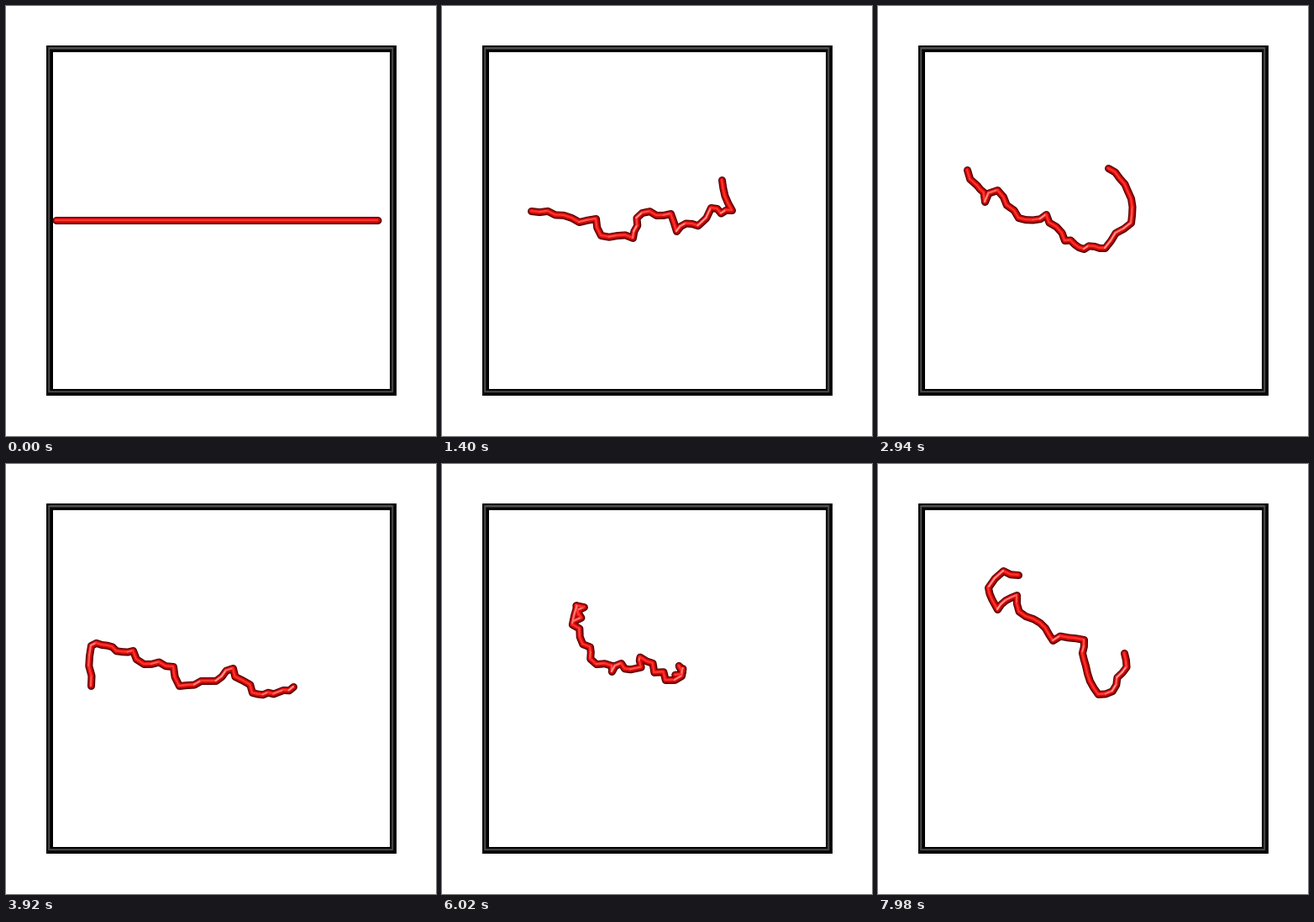
Recreate the animation shown at these times as a matplotlib script. Size 512 px wide and 512 px high, loop 8000 ms.

```python
import numpy as np
import matplotlib.pyplot as plt
from matplotlib.animation import FuncAnimation
from matplotlib.collections import LineCollection

SIZE, DPI = 512, 64
PX = 72 / DPI               # one pixel in points
BEADS, BOND = 40, 9.83      # chain length and bond length in pixels
TICK, HOLD, FRAMES = 20, 7, 400
ROUGH, TURN = 0.13, 0.3     # kinks along the chain, turning per step
rng = np.random.default_rng(11)


def chain(*corners):
    """Crumple a coarse outline: split the longest bond, push its middle aside."""
    pts = [np.array(c, float) for c in corners]
    while len(pts) < BEADS:
        gaps = np.diff(pts, axis=0)
        k = int(np.argmax(np.hypot(*gaps.T)))
        side = gaps[k][::-1] * (-1, 1)
        pts.insert(k + 1, (pts[k] + pts[k + 1]) / 2 + side * rng.normal(0, ROUGH))
    return np.array(pts) + 0.5


straight = np.column_stack([np.linspace(60, 443, BEADS), np.full(BEADS, 255.5)])
coiled = chain((106, 244), (183, 253), (189, 273), (227, 276), (238, 246),
               (272, 247), (279, 268), (320, 240), (345, 243), (333, 207))
sagging = chain((106, 195), (127, 233), (142, 219), (167, 252), (200, 248),
                (222, 279), (270, 288), (301, 258), (297, 220), (274, 193))
hooked = chain((101, 264), (101, 216), (151, 222), (164, 238), (199, 241),
               (206, 264), (241, 258), (270, 243), (293, 272), (342, 265))
curled = chain((117, 243), (107, 210), (125, 190), (138, 213), (189, 248),
               (224, 231), (251, 237), (260, 266), (304, 288), (303, 232))
waved = chain((150, 146), (170, 163), (155, 194), (174, 199), (184, 227),
              (213, 247), (232, 203), (290, 197), (317, 233), (298, 240))
folded = chain((167, 132), (149, 127), (131, 147), (142, 173), (165, 156),
               (208, 210), (245, 209), (247, 240), (262, 274), (293, 225))

KEYS = [(0, straight), (10, coiled), (21, sagging), (28, hooked),
        (37, curled), (49, waved), (57, folded)]


def bonds(pts):
    """Bond vectors in 3D; depth makes up the missing length."""
    d = np.diff(pts, axis=0)
    z = np.sqrt(np.clip(BOND**2 - (d**2).sum(1), 0, None))
    return np.column_stack([d, z * rng.choice([-1, 1], len(d))])


def norm(v):
    return np.linalg.norm(v, axis=1, keepdims=True)


def diffuse():
    """Poses per step: bonds turn at random, pinned at the key poses."""
    out = []
    vecs = [bonds(p) for _, p in KEYS]
    for k, ((s0, p0), (s1, p1)) in enumerate(zip(KEYS, KEYS[1:])):
        n = s1 - s0
        walk = rng.normal(0, TURN, (n + 1, BEADS - 1, 3))
        walk[0] = 0
        walk = walk.cumsum(axis=0)
        b0, b1 = vecs[k], vecs[k + 1]
        for j in range(n):
            u = j / n
            v = b0 * (1 - u) + b1 * u + BOND * (walk[j] - u * walk[n])
            v *= (norm(b0) * (1 - u) + norm(b1) * u) / norm(v)
            p = np.vstack([[0, 0], v[:, :2].cumsum(axis=0)])
            mid = p0.mean(0) * (1 - u) + p1.mean(0) * u
            out.append(p - p.mean(0) + mid)
    return out + [KEYS[-1][1]]


poses = diffuse()

fig = plt.figure(figsize=(SIZE / DPI, SIZE / DPI), dpi=DPI, facecolor="white")
ax = fig.add_axes([0, 0, 1, 1])
ax.set(xlim=(0, SIZE), ylim=(SIZE, 0))
ax.axis("off")


def tube(width, color, x=(), y=(), join="round"):
    return ax.plot(x, y, color=color, lw=width * PX, solid_capstyle="round",
                   solid_joinstyle=join, snap=False)[0]


# box frame
L, R, T, B = 52, 461, 51, 460
loop = np.array([(L, T), (R, T), (R, B), (L, B), (L, T), (R, T)])
tube(8, "#000000", *loop.T, join="miter")
tube(2.6, "#2a2a2a", *(loop - 0.8).T, join="miter")
tube(1.2, "#525252", *(loop - 0.8).T, join="miter")

# width, colour and shift towards the light
SHADES = [(9.0, "#4a0000", 0), (6.8, "#a80404", 0.2), (4.8, "#dc0c0c", 0.3)]
layers = [(tube(w, c), s) for w, c, s in SHADES]
shine = LineCollection([], linewidths=2.2 * PX, capstyle="round", zorder=4)
ax.add_collection(shine, autolim=False)
DULL, BRIGHT = np.array([1.0, 0.2, 0.17]), np.array([1.0, 0.6, 0.58])


def draw(i):
    p = poses[i // HOLD]
    for line, shift in layers:
        line.set_data(*(p - shift).T)
    q = p - 0.5
    dx, dy = np.diff(p, axis=0).T
    # rising and upright bonds catch the light
    glow = np.clip((0.3 * dy**2 - 1.7 * dx * dy) / (dx**2 + dy**2), 0, 1)
    shine.set_segments(np.stack([q[:-1], q[1:]], axis=1))
    shine.set_color(DULL + (BRIGHT - DULL) * glow[:, None])
    return [*(line for line, _ in layers), shine]


anim = FuncAnimation(fig, draw, frames=FRAMES, interval=TICK, repeat=True,
                     repeat_delay=0, init_func=lambda: draw(0))
plt.show()
```
